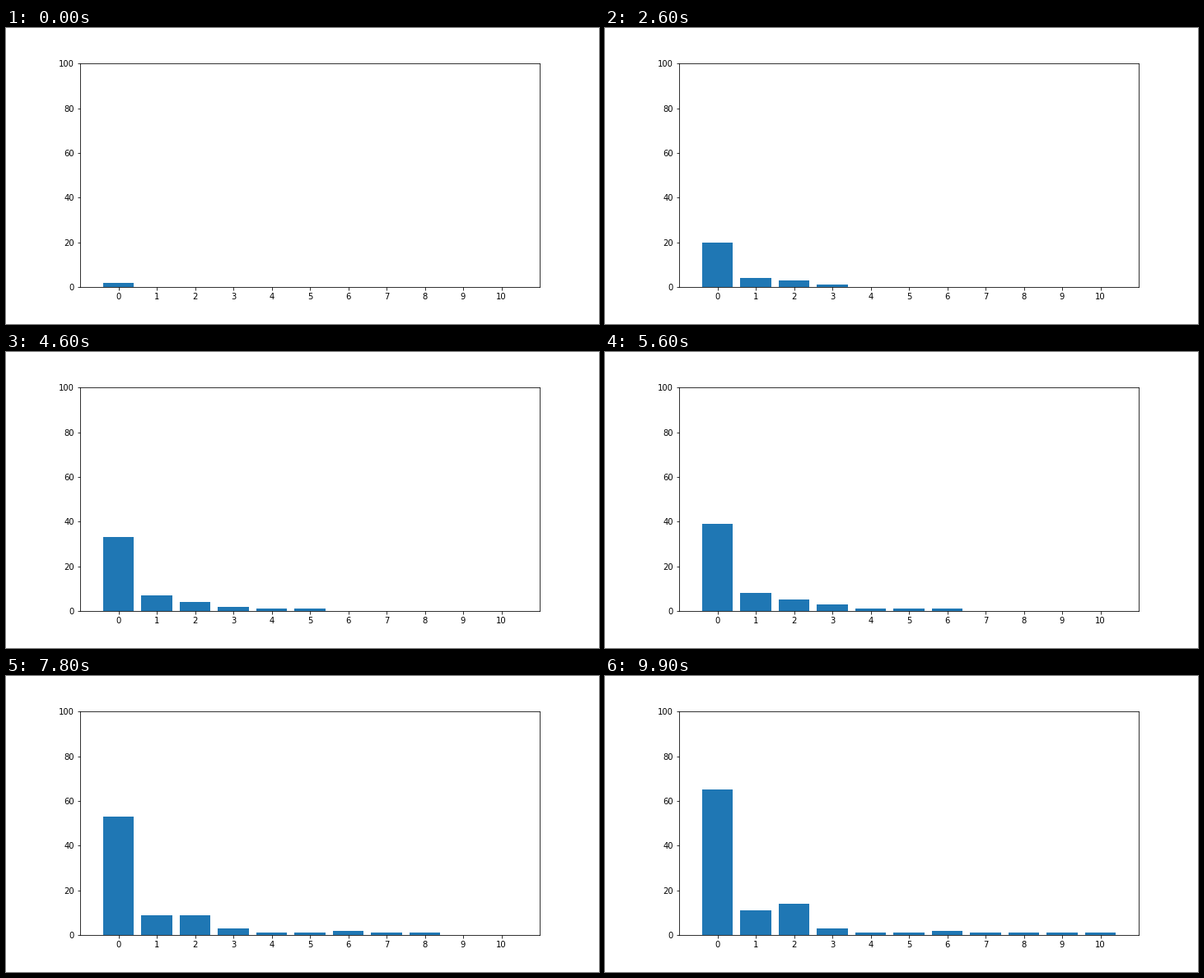
Write a matplotlib script that moves like this. It is 720x360 px and loops after 10000 ms.

```python
import matplotlib.pyplot as plt
import numpy as np
from matplotlib.animation import FuncAnimation

FRAMES = 100
INTERVAL = 100
BARS = 11

# Bars that keep growing follow a piecewise linear trend through a few points.
KEY_STEPS = (0, 16, 36, 65, 99)
TRENDS = {
    1: (0, 2.5, 6.5, 8.9, 11.2),
    2: (0, 2.1, 4.15, 6.5, 14.3),
    3: (0, 0.5, 1.6, 3.9, 3.9),
    6: (0, 0, 0.1, 1.8, 2.6),
}
# The other bars appear once with a height of one.
STARTS = {4: 28, 5: 31, 7: 62, 8: 71, 9: 91, 10: 96}


def counts(step):
    """Bar heights; each step adds one unit, bar 0 takes what is left over."""
    heights = np.zeros(BARS, dtype=int)
    for bar, trend in TRENDS.items():
        heights[bar] = int(np.interp(step, KEY_STEPS, trend))
    for bar, start in STARTS.items():
        heights[bar] = step >= start
    heights[0] = step + 2 - heights.sum()
    return heights


plt.rcParams.update({"font.family": "DejaVu Sans", "font.size": 10})
fig, ax = plt.subplots(figsize=(10, 5), dpi=72)
fig.subplots_adjust(left=0.125, right=0.9, bottom=0.125, top=0.88)

bars = ax.bar(range(BARS), counts(0), width=0.8, color="#1f77b4")
ax.set_xlim(-1, BARS)
ax.set_ylim(0, 100)
ax.set_xticks(range(BARS))


def update(step):
    for bar, height in zip(bars, counts(step)):
        bar.set_height(height)
    return bars.patches


anim = FuncAnimation(fig, update, frames=FRAMES, interval=INTERVAL,
                     repeat=True, repeat_delay=0)
plt.show()
```
